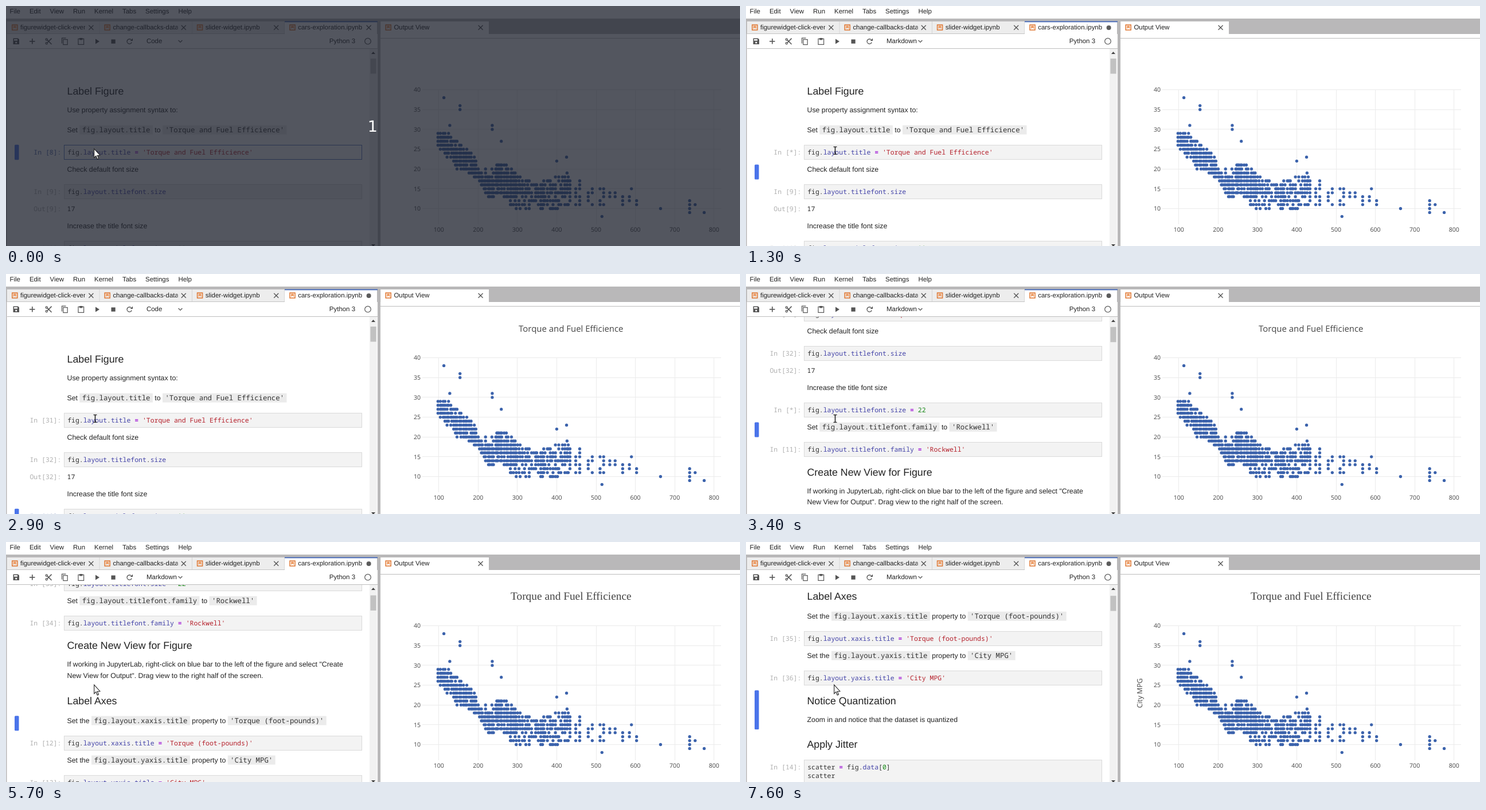
These frames come from a looping animation (1280 by 420 pixels, 8 s). An HTML page with a canvas:

```html
<!DOCTYPE html>
<html lang="en">
<head>
<meta charset="utf-8">
<title>Notebook session</title>
<style>
  html, body { margin: 0; width: 100%; height: 100%; overflow: hidden; background: #fff; }
  canvas { display: block; }
</style>
</head>
<body>
<canvas id="stage" width="1280" height="420"></canvas>
<script>
const ctx = document.getElementById('stage').getContext('2d');
const LOOP = 8000;
const SANS = '"Liberation Sans", Arial, sans-serif';
const MONO = '"Noto Sans Mono", monospace';
const OPEN = '"Open Sans", sans-serif';
const SERIF = '"Liberation Serif", serif';
const UI = `11.44px ${SANS}`, BODY = `12.34px ${SANS}`, HEAD = `17.8px ${SANS}`;
const CODE = `11.48px ${MONO}`, INLINE = `12.36px ${MONO}`;
const GREY = '#b9b8b9', ICON = '#555', INK = '#222';

// ---- drawing helpers ----
function rect(x, y, w, h, color) {
  ctx.fillStyle = color;
  ctx.fillRect(x, y, w, h);
}
function text(str, x, y, font, color = INK, align = 'left') {
  ctx.font = font;
  ctx.fillStyle = color;
  ctx.textAlign = align;
  ctx.fillText(str, x, y);
  return ctx.measureText(str).width;
}
function disc(x, y, r, color) {
  ctx.fillStyle = color;
  ctx.beginPath();
  ctx.arc(x, y, r, 0, 7);
  ctx.fill();
}
function trace(points, close) {
  ctx.beginPath();
  points.forEach(([x, y], i) => i ? ctx.lineTo(x, y) : ctx.moveTo(x, y));
  if (close) ctx.closePath();
}
function line(points, color, width = 1) {
  trace(points);
  ctx.strokeStyle = color;
  ctx.lineWidth = width;
  ctx.stroke();
}
function poly(points, color) {
  trace(points, true);
  ctx.fillStyle = color;
  ctx.fill();
}
function ring(x, y, r, width, from = 0, to = 7) {
  ctx.beginPath();
  ctx.arc(x, y, r, from, to);
  ctx.strokeStyle = ICON;
  ctx.lineWidth = width;
  ctx.stroke();
}
function frame(x, y, w, h, color, width = 1) {
  ctx.strokeStyle = color;
  ctx.lineWidth = width;
  ctx.strokeRect(x, y, w, h);
}
function clipped(x, y, w, h, draw) {
  ctx.save();
  ctx.beginPath();
  ctx.rect(x, y, w, h);
  ctx.clip();
  draw();
  ctx.restore();
}

// ---- notebook content: "# " marks a heading, "\n" a wrapped line ----
const md = (...blocks) => ({ blocks });
const code = (src, { took = 200, out } = {}) => ({ src: src.split('\n'), took, out });

const cells = [
  md('# Label Figure', 'Use property assignment syntax to:',
    "Set `fig.layout.title` to `'Torque and Fuel Efficience'`"),
  code("fig.layout.title = 'Torque and Fuel Efficience'"),
  md('Check default font size'),
  code('fig.layout.titlefont.size', { out: '17' }),
  md('Increase the title font size'),
  code('fig.layout.titlefont.size = 22'),
  md("Set `fig.layout.titlefont.family` to `'Rockwell'`"),
  code("fig.layout.titlefont.family = 'Rockwell'", { took: 100 }),
  md('# Create New View for Figure',
    'If working in JupyterLab, right-click on blue bar to the left of the figure and select "Create\n' +
    'New View for Output". Drag view to the right half of the screen.'),
  md('# Label Axes'),
  md("Set the `fig.layout.xaxis.title` property to `'Torque (foot-pounds)'`"),
  code("fig.layout.xaxis.title = 'Torque (foot-pounds)'"),
  md("Set the `fig.layout.yaxis.title` property to `'City MPG'`"),
  code("fig.layout.yaxis.title = 'City MPG'", { took: 100 }),
  md('# Notice Quantization', 'Zoom in and notice that the dataset is quantized'),
  md('# Apply Jitter'),
  code('scatter = fig.data[0]\nscatter\n'),
];
// Each key press runs the selected cell and selects the next one.
const presses = [1300, 1900, 2300, 2900, 3400, 4100, 4700, 5200, 5700, 6100, 6500, 6900, 7500];
const [titleCell, outputCell, sizeCell, familyCell, , yAxisCell] = cells.filter(c => c.src);

// ---- layout ----
const GAP = 9.75, ROW = 25, CODE_LINE = 15.3, WRAP = 19.3, OUTPUT = 30, VIEW_BOTTOM = 420, SCROLL_TO = 260.3;
let flow = 132.25, order = 0;
cells.forEach((cell, i) => {
  cell.top = flow;
  if (cell.src) {
    cell.run = presses[i - 1] ?? Infinity;
    cell.done = cell.run + cell.took;
    cell.before = 8 + order;
    cell.after = 31 + order++;
    cell.height = ROW + CODE_LINE * (cell.src.length - 1);
    flow += cell.out ? OUTPUT : 0;
  } else {
    cell.lines = [];
    let y, previous;
    for (const block of cell.blocks) {
      const heading = block.startsWith('# ');
      y = y === undefined ? (heading ? 17 : 7.5) : y + (previous ? 33 : 34.5);
      block.split('\n').forEach((str, n) => {
        if (n) y += WRAP;
        cell.lines.push([y, str]);
      });
      previous = heading;
    }
    cell.height = y + (previous ? 18 : 17);
  }
  flow += cell.height + GAP;
});

const activeAt = t => 1 + presses.filter(p => p <= t).length;
// A selected cell that starts below the view is scrolled up into it.
function scrollFor(active) {
  let scroll = 0;
  for (const { top } of cells.slice(0, active + 1))
    if (top - scroll > VIEW_BOTTOM) scroll = top - SCROLL_TO;
  return scroll;
}

// ---- notebook drawing ----
function richLine(y, str) {
  if (str.startsWith('# ')) return text(str.slice(2), 106.5, y + 6.2, HEAD);
  let x = 106.5;
  str.split('`').forEach((part, i) => {
    if (i % 2 === 0) {
      x += text(part, x, y + 4.2, BODY);
      return;
    }
    ctx.font = INLINE;
    const w = ctx.measureText(part).width;
    rect(x, y - 8, w + 8.8, 16, '#ebebeb');
    text(part, x + 4.4, y + 4, INLINE, '#333');
    x += w + 8.8;
  });
}
function codeLine(y, src) {
  let x = 107.2, previous = '';
  for (const token of src.match(/'[^']*'|\d+|\w+|\s+|./g) || []) {
    const color = token[0] === "'" ? '#b5202b' : token === '=' ? '#a626d8'
      : /^\d/.test(token) ? '#1a8a1a' : previous === '.' ? '#4343a8' : '#333';
    x += text(token, x, y, (token === '=' ? 'bold ' : '') + CODE, color);
    previous = token;
  }
}
function bar(y, h) {
  ctx.fillStyle = '#4a74ea';
  ctx.beginPath();
  ctx.roundRect(15, y - .7, 7.5, h + 1.4, 1.5);
  ctx.fill();
}
function drawCode(cell, y, t, selected) {
  const top = Math.floor(y) + .5, base = top + 16.6;
  const editing = selected && t < presses[0];
  rect(101.5, top, 519, cell.height, editing ? '#fff' : '#f3f3f3');
  frame(101.5, top, 519, Math.round(cell.height), editing ? '#5576bf' : '#dadada');
  const n = t < cell.run ? cell.before : t < cell.done ? '*' : cell.after;
  text(`In [${n}]:`, 96.5, base, CODE, selected ? '#5068a8' : '#b0b0b0', 'right');
  cell.src.forEach((src, i) => codeLine(base + CODE_LINE * i, src));
  if (cell.out && n !== '*') {
    if (selected) bar(top + OUTPUT, 24.5);
    text(`Out[${n}]:`, 96.5, base + 29.5, CODE, selected ? '#bf5b3d' : '#b0b0b0', 'right');
    text(cell.out, 106.5, base + 29.5, CODE);
  }
}
function drawNotebook(t) {
  const active = activeAt(t), scroll = scrollFor(active);
  const outputHidden = t >= outputCell.run && t < outputCell.done;
  clipped(2, 75, 632, 345, () => cells.forEach((cell, i) => {
    const y = cell.top - scroll - (outputHidden && cell.top > outputCell.top ? 12 : 0);
    const selected = i === active;
    if (selected) bar(y, cell.height);
    if (cell.src) drawCode(cell, y, t, selected);
    else cell.lines.forEach(([dy, str]) => richLine(y + dy, str));
  }));
  rect(634, 75, 13, 345, '#f1f1f1');
  rect(635.5, 92 + scroll * .004, 10, 26.5, '#c1c1c1');
  poly([[637, 84], [640.5, 80], [644, 84]], '#444');
  poly([[637, 417], [644, 417], [640.5, 421]], '#444');
  drawToolbar(cells[active].src ? 'Code' : 'Markdown');
}

// ---- window chrome ----
function bookIcon(x) {
  frame(x + 1, 33, 9, 9, '#e0762f', 1.5);
  poly([[x + 3, 34.5], [x + 8, 34.5], [x + 8, 40], [x + 5.5, 38], [x + 3, 40]], '#ee9a60');
}
function tab(x, w, label, front, dirty) {
  const closeX = x + w - 14.4;
  rect(x, 27, w, 22, front ? '#fff' : '#ededed');
  bookIcon(x + 8);
  clipped(x, 27, w - 24.7, 22, () => text(label, x + 23.2, 41.1, UI));
  if (dirty) return disc(closeX, 38, 4, '#5c5c5c');
  for (const s of [-4, 4]) line([[closeX - s, 33.8], [closeX + s, 41.8]], ICON, 1.3);
}
function drawChrome(t) {
  rect(0, 0, 1280, 420, '#fff');
  let x = 6.5;
  for (const name of ['File', 'Edit', 'View', 'Run', 'Kernel', 'Tabs', 'Settings', 'Help'])
    x += text(name, x, 12.5, UI) + 15.95;
  rect(0, 22, 1280, 27, GREY);
  rect(0, 22, 1.5, 398, GREY);
  rect(648, 22, 5, 398, GREY);
  ['figurewidget-click-events', 'change-callbacks-datashader', 'slider-widget', 'cars-exploration']
    .forEach((name, i) => tab(1.8 + 161.4 * i, 161, name + '.ipynb', i === 3, i === 3 && t >= presses[0]));
  rect(2, 48, 484, 1, '#c4c4c4');
  rect(486, 26.5, 162, 1.8, '#4267b8');
  tab(653.2, 188.8, 'Output View', true);
  rect(2, 74, 646, 1, '#bdbdbd');
  rect(653, 56, 627, 1, '#bdbdbd');
}
function drawToolbar(kind) {
  // save
  poly([[12.5, 56.5], [21, 56.5], [23, 58.5], [23, 67], [12.5, 67]], ICON);
  rect(14, 58, 6, 2.6, '#fff');
  disc(17.7, 64, 1.6, '#fff');
  // add
  rect(41, 61, 9.5, 1.6, ICON);
  rect(45, 57, 1.6, 9.5, ICON);
  // cut
  ring(70.7, 58.4, 1.6, 1.3);
  ring(70.7, 65.2, 1.6, 1.3);
  line([[72, 59.4], [79.5, 67]], ICON, 1.5);
  line([[72, 64.2], [79.5, 56.6]], ICON, 1.5);
  // copy
  frame(99.8, 58.6, 7.4, 9, ICON, 1.2);
  line([[97.5, 65.5], [97.5, 56.2], [104.5, 56.2]], ICON, 1.2);
  // paste
  frame(126, 57.4, 9.6, 10, ICON, 1.2);
  rect(128.2, 56, 5.2, 3.4, ICON);
  // run, stop
  poly([[156, 57.5], [163, 62], [156, 66.5]], ICON);
  rect(183.5, 58.5, 7.2, 7.2, ICON);
  // restart
  ring(215.3, 62, 4.2, 1.4, .4, 5.4);
  poly([[216.5, 61], [221, 61], [221, 56.5]], ICON);
  text(kind, 245, 65, UI);
  line([[300.6, 60], [304, 63.4], [307.4, 60]], ICON, 1.3);
  text('Python 3', 609, 65, UI, INK, 'right');
  ring(631, 61.7, 5.3, 1.2);
}

// ---- scatter plot ----
const torqueX = v => 754.7 + (v - 100) * .6857;
const mpgY = v => 146.6 + (40 - v) * 6.93;
function curve(points, x) {
  const i = Math.max(1, points.findIndex(p => p[0] >= x));
  const [[x0, y0], [x1, y1]] = points.slice(i - 1, i + 1);
  return y0 + (y1 - y0) * (x - x0) / (x1 - x0);
}
let seed = 11;
const random = () => (seed = seed * 16807 % 2147483647) / 2147483647;

// Whole MPG values scattered between two edges that fall with torque.
const upper = [[95, 30], [130, 29], [190, 23.5], [205, 19.5], [265, 22], [300, 18.5], [345, 16.5], [420, 19.5], [520, 15], [620, 12.5]];
const lower = [[95, 26], [150, 19.5], [185, 18.5], [230, 12.5], [255, 13.5], [290, 10], [400, 9.5], [430, 11], [620, 11]];
const dots = [[113, 38], [154, 36], [154, 35], [128, 31], [236, 31], [236, 30], [259, 27], [425, 23],
  [400, 22], [590, 15], [515, 8], [664, 10], [752, 11], [775, 9]];
for (let v = 9; v <= 12; v++) dots.push([738, v]);
for (let torque = 98; torque < 620; torque += torque < 430 ? 2.5 + random() * 4 : 8 + random() * 16) {
  const high = curve(upper, torque), low = curve(lower, torque);
  for (let v = Math.ceil(low); v <= high; v++) {
    const core = 1 - Math.abs(2 * v - high - low) / (high - low);
    const density = torque < 300 ? .6 + .5 * core : .45 + .35 * core;
    if (random() < density) dots.push([torque, v]);
  }
}

function drawPlot(t) {
  const tick = `10.56px ${OPEN}`;
  for (let v = 100; v <= 800; v += 100) {
    rect(Math.round(torqueX(v) - .45), 146, 1, 236, '#ebebeb');
    text(v, torqueX(v), 395.4, tick, '#444', 'center');
  }
  for (let v = 10; v <= 40; v += 5) {
    rect(726, Math.round(mpgY(v) - .5), 521, 1, '#ebebeb');
    text(v, 723, mpgY(v) + 3.8, tick, '#444', 'right');
  }
  for (const [torque, mpg] of dots) disc(torqueX(torque), mpgY(mpg), 2.65, '#3c63ac');

  if (t >= titleCell.done) {
    const size = t < sizeCell.done ? 14.96 : 19.36;
    const family = t < familyCell.done ? OPEN : SERIF;
    text('Torque and Fuel Efficience', 985.3, 101.2, `${size}px ${family}`, '#444', 'center');
  }
  if (t >= yAxisCell.done) {
    ctx.save();
    ctx.translate(690.6, 264.5);
    ctx.rotate(-Math.PI / 2);
    text('City MPG', 0, 0, `12.32px ${OPEN}`, '#444', 'center');
    ctx.restore();
  }
}

// ---- pointer and countdown ----
function drawArrow() {
  const shape = [[0, 0], [0, 15.5], [3.6, 12.2], [6, 18], [8.5, 17], [6.1, 11.4], [11, 11.2]]
    .map(([x, y]) => [153.7 + x * .92, 250 + y]);
  poly(shape, '#fff');
  ctx.strokeStyle = INK;
  ctx.lineWidth = 1.1;
  ctx.stroke();
}
function drawBeam() {
  line([[155.5, 247], [155.5, 259]], INK, 1.6);
  for (const y of [246.5, 259.5]) line([[152.5, y], [158.5, y]], INK, 1.3);
}

function draw(t) {
  const countdown = t < 200;
  drawChrome(t);
  drawNotebook(t);
  drawPlot(t);
  if (countdown) {
    rect(0, 0, 1280, 420, 'rgba(30, 34, 45, .76)');
    text('1', 639.3, 220, '27px "DejaVu Sans", sans-serif', '#fff', 'center');
  }
  if (countdown || t >= sizeCell.done) drawArrow();
  else drawBeam();
}
function tickFrame() {
  draw(performance.now() % LOOP);
  requestAnimationFrame(tickFrame);
}
ctx.textRendering = 'geometricPrecision';
tickFrame();
</script>
</body>
</html>
```
